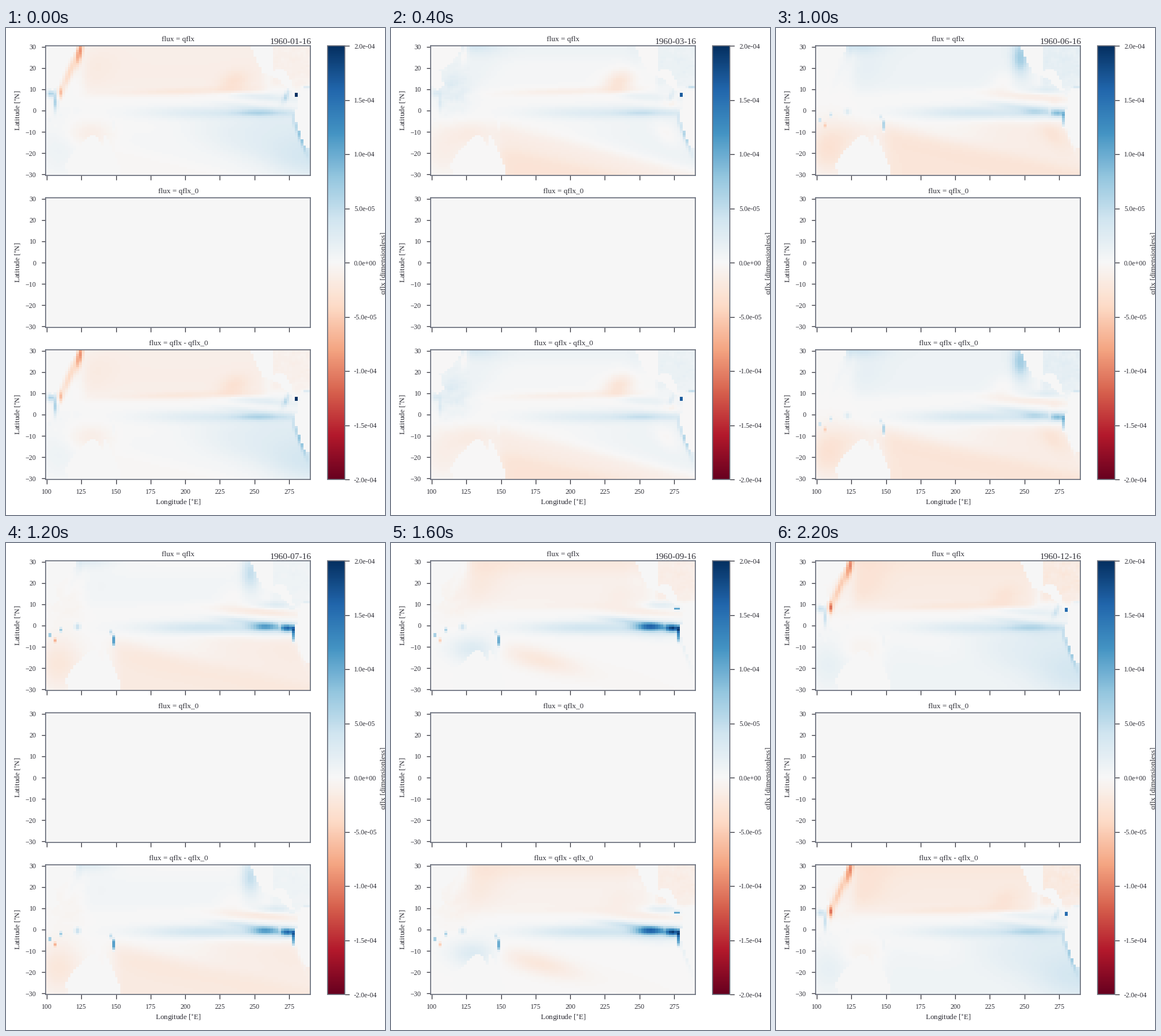
A matplotlib script for the animation above (2400 ms loop, 660x849 px).

```python
import matplotlib.pyplot as plt
import numpy as np
from matplotlib.animation import FuncAnimation
from matplotlib.path import Path

W, H, DPI = 660, 849, 100
MONTHS, LOOP_MS = 12, 2400
VMAX = 2e-4
INK, EDGE = "#2e2e36", "#6a6f7c"

plt.rcParams.update({
    "font.family": "Liberation Serif",
    "mathtext.fontset": "stix",
    "text.color": INK,
    "axes.labelcolor": INK,
    "axes.edgecolor": EDGE,
    "axes.linewidth": 1.25,
    "xtick.color": INK,
    "ytick.color": INK,
})

# Grid of 2 x 1 degree cells
LEFT, BOTTOM, NX, NY = 99.2, -30.5, 96, 61
lon, lat = np.meshgrid(LEFT + 1 + 2 * np.arange(NX), np.arange(-30, 31))
month = np.arange(1, MONTHS + 1)


def pt(px):
    return px * 72 / DPI


def step(x, width=1.0):
    return 1 / (1 + np.exp(-x / width))


def blob(x, y, w, h, angle=0, power=2):
    a = np.radians(angle)
    u = (lon - x) * np.cos(a) + (lat - y) * np.sin(a)
    v = (lat - y) * np.cos(a) - (lon - x) * np.sin(a)
    return np.exp(-np.abs(u / w) ** power - np.abs(v / h) ** power)


def cell(x, y, w=1.0, h=1.0):
    return blob(x, y, w, h, power=4)


def season(low, high, peak, sharp=1):
    """Yearly swing from low to high; a larger sharp gives a shorter peak."""
    hump = (1 + np.cos(2 * np.pi * (month - peak) / 12)) / 2
    return low + (high - low) * hump ** sharp


def over(pattern, cycle):
    return cycle[:, None, None] * pattern


def inside(*corners):
    points = np.column_stack([lon.ravel(), lat.ravel()])
    return Path(corners).contains_points(points).reshape(lon.shape)


def texture(seed):
    """Gently smoothed noise around one."""
    noise = np.random.default_rng(seed).uniform(.2, 1.8, lon.shape)
    for axis in (0, 1):
        noise = (np.roll(noise, 1, axis) + noise + np.roll(noise, -1, axis)) / 3
    return noise


def land_mask():
    australia = inside((113.7, -25), (119, -19.5), (131, -11.7), (135.5, -11.7),
                       (140, -17), (142.3, -11), (149.4, -21), (153.8, -28),
                       (153.8, -32), (115.3, -32))
    asia = inside((98, 32), (122, 32), (119.5, 26), (110, 20.5), (106, 19),
                  (109, 12), (105, 9.5), (98, 13))
    north_america = inside((246.5, 32), (251, 24), (256.5, 17.5), (266, 15.5),
                           (276.5, 9), (283, 9), (277, 10.3), (276.5, 14.5),
                           (270, 20), (264, 18.5), (263, 32))
    south_america = inside((282.3, 10.5), (292, 11), (292, -18.5), (286, -16.5),
                           (279.6, -4.5), (279.6, -1), (282.3, 7))
    return australia | asia | north_america | south_america


def north_pacific():
    basin = step(lon - 127, 2) * step(258 - lon, 2)
    return (over(basin * step(lat - 9, 1.5), season(-1.8, 1.1, 5.3))
            + over(basin * step(lat - 25, 1.8), season(-1.3, .9, 3.5))
            + over(blob(135, 20, 17, 9, 15), season(-1.4, 1, 4.5))
            + over(blob(128, 31, 20, 4), season(-1, 3.4, 4.8))
            + over(blob(205, 9.2, 55, 1.7, 1), season(-1.6, -.2, 7.5))
            + over(blob(235, 13.5, 11, 5, 10), season(-.5, -2.8, 3, 2))
            + over(blob(247, 25, 6, 8), season(0, 6, 6, 4)))


def asian_coast():
    thai_gulf = blob(103, 8, 3, 1.6) + blob(106.4, 4, 1.4, 4)
    return (over(blob(115, 11, 13, 12) * texture(3), season(-.6, 2, 3.3, 3))
            + over(blob(123.8, 28, 2, 6, -15), season(.8, -8.5, 12.6, 3))
            + over(blob(116.5, 18, 11, 2.4, 56), season(.4, -5, 12.3, 6))
            + over(blob(110, 8.5, 1.5, 2.5), season(0, -9, 12, 8))
            + over(thai_gulf, season(0, 6.5, 1, 4)))


def south_pacific():
    # A ridge running down to the east splits the basin
    ridge = lat + 8 + .15 * (lon - 155)
    west = step(-ridge, 1.8) * step(lon - 148, 3)
    east = step(ridge, 2.5) * step(-4 - lat, 1.5) * step(lon - 215, 14)
    return (over(west, season(-2.7, .9, 11.3))
            + over(west * step(-ridge - 10, 1.5), season(.2, -1.6, 2.3, 8))
            + over(east, season(-1.6, 2.4, 12.5))
            + over(blob(286, -24, 28, 12), season(0, 1.6, 12.3, 3))
            + over(blob(270, -11, 11, 5, -25), season(0, -3, 4.5, 6))
            + over(blob(178, -16, 27, 5, -9), season(0, -2, 9, 8))
            + over(blob(109, -18, 16, 12), season(-3, 1.7, 11.5))
            + over(blob(130, -11, 17, 6), season(-1.5, 2.8, 9.2, 3)))


def equator():
    return (over(blob(215, -1, 46, 3), season(2.3, 4, 8.3))
            + over(blob(243, 2, 22, 1.5, -4), season(.5, 3.4, 9))
            + over(blob(253, -1, 20, 1.7), season(.5, 4, 1.5, 2))
            + over(blob(265, -2, 22, 4), season(.6, 2.6, 9))
            + over(blob(258, -.5, 10, 1.8), season(0, 13, 8.4, 4))
            + over(blob(274.3, -1.2, 5.5, 1.7), season(1, 17, 8.2, 3)))


def american_coast():
    gulf = step(lon - 262, .5) * step(lat - 11)
    return (over(gulf * texture(7), season(-2.3, 2.2, 4.8))
            + over(blob(283, -12, 8, 1.4, -61), season(1, 5.5, 2))
            + over(blob(255, 6.5, 30, 1.9, -3), season(-2, 2.2, 1.3))
            + over(blob(266, 9.8, 12, 1.7), season(.5, 2.6, 8))
            + over(blob(272, 4, 5, 2.5), season(0, -2.8, 4.2, 6))
            + over(blob(273, 7, 4, 1.6, 50), season(0, 4.5, 1.2, 3)))


def coastal_cells():
    straits = (cell(148.2, -7, 1, 2.6) + .4 * cell(146.2, -3)
               + .4 * cell(122.2, -.5, 2, 1.5) + .7 * cell(102.2, -4.5)
               + .7 * cell(110.2, -2) - .5 * cell(106.2, -7))
    return (over(straits, season(.5, 13, 7.8, 3))
            + over(cell(280.2, 7.5), season(0, 23, 1.6, 2))
            + over(cell(277.2, 8, 2, .8), season(0, 11, 9, 8))
            + over(cell(278.2, -4, 1, 3.6), season(1, 12, 8, 3))
            + over(cell(268.2, -.5, 1, 1.6), season(0, -3, 7.5, 4))
            + over(cell(288, 11, 3.5, .8), season(.5, 4, 3)))


sea = (north_pacific() + asian_coast() + south_pacific() + equator()
       + american_coast())
fields = 1e-5 * (np.where(land_mask(), 0, sea) + coastal_cells())

fig = plt.figure(figsize=(W / DPI, H / DPI), dpi=DPI, facecolor="white")


def add_axes(x0, y0, x1, y1):
    return fig.add_axes([x0 / W, 1 - y1 / H, (x1 - x0) / W, (y1 - y0) / H])


def write(x, y, text, px=13.2, **kw):
    return fig.text(x / W, 1 - y / H, text, fontsize=pt(px), **kw)


def add_map(top, title, last=False):
    ax = add_axes(69, top, 530, top + 226)
    img = ax.imshow(np.zeros((NY, NX)), cmap="RdBu", vmin=-VMAX, vmax=VMAX,
                    origin="lower", aspect="auto", interpolation="nearest",
                    extent=(LEFT, LEFT + 2 * NX, BOTTOM, BOTTOM + NY))
    ax.set(xlim=(LEFT, 290.35), ylim=(-30.5, 30.5),
           xticks=range(100, 276, 25), yticks=range(-30, 31, 10))
    ax.tick_params(length=pt(7.5), width=pt(1.3), pad=pt(9),
                   labelsize=pt(12), labelbottom=last)
    write(300, top - 8, title, ha="center", va="baseline")
    write(20, top + 113, r"Latitude [$^{\circ}$N]", rotation=90,
          ha="center", va="center")
    return img


top_map = add_map(31, "flux = qflx")
add_map(296, "flux = qflx_0")
low_map = add_map(561, "flux = qflx - qflx_0", last=True)
write(300, 827, r"Longitude [$^{\circ}$E]", ha="center", va="center")
date = write(532, 28, "", px=15.4, ha="right", va="baseline")

bar = fig.colorbar(top_map, cax=add_axes(560, 31, 590, 787),
                   ticks=np.linspace(-VMAX, VMAX, 9),
                   format=lambda v, _: f"{v:.1e}")
bar.ax.tick_params(length=pt(8), width=pt(1.3), pad=pt(8), labelsize=pt(12))
write(658.5, 410, "qflx [dimensionless]", rotation=90,
      ha="center", va="center")


def draw(i):
    top_map.set_data(fields[i])
    low_map.set_data(fields[i])
    date.set_text(f"1960-{i + 1:02d}-16")
    return top_map, low_map, date


anim = FuncAnimation(fig, draw, frames=MONTHS, interval=LOOP_MS / MONTHS,
                     repeat=True, repeat_delay=0)
plt.show()
```
